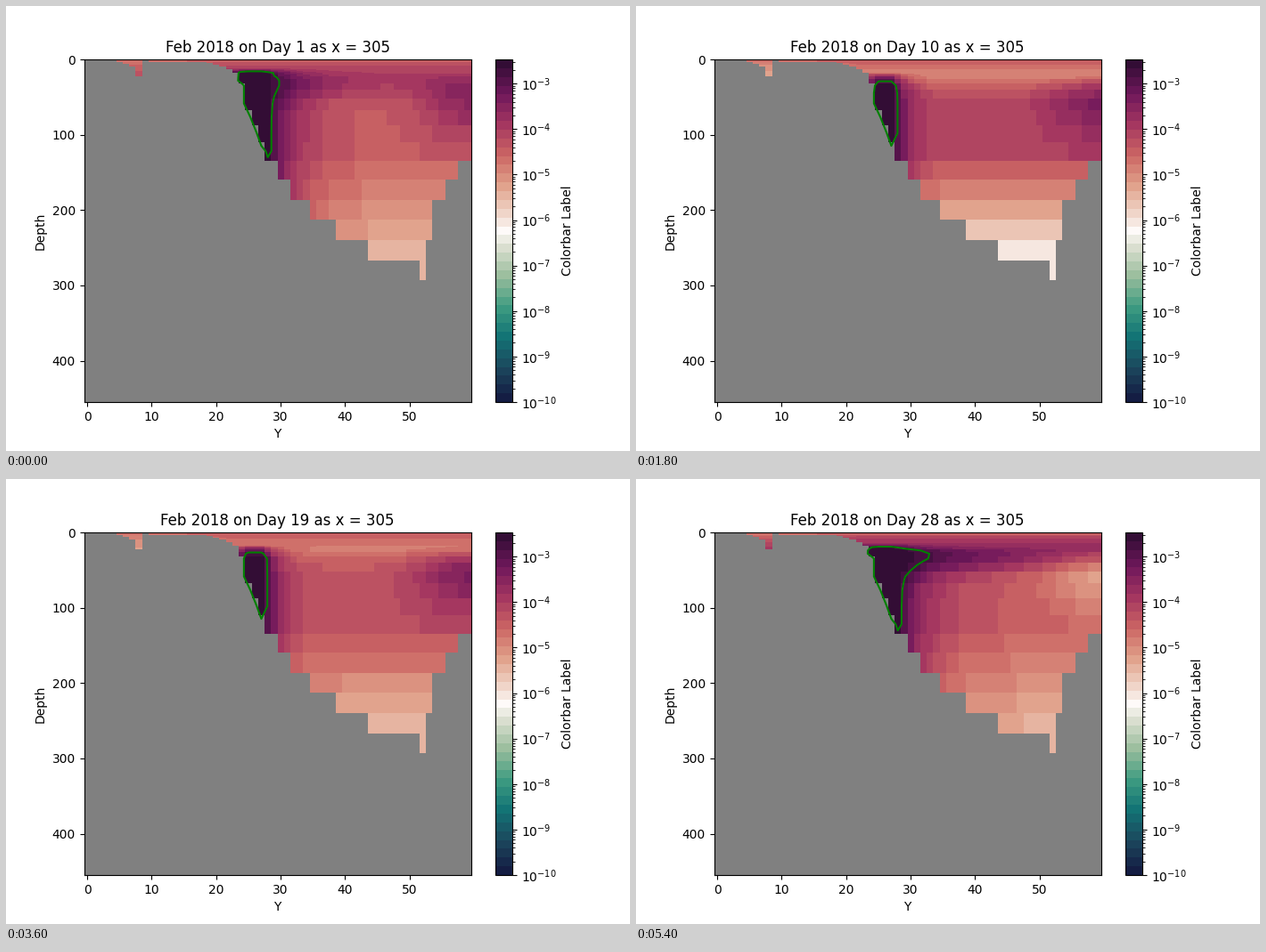
A matplotlib script that plays this animation: 700 by 500 pixels, repeating every 5.6 s.

```python
import numpy as np
import matplotlib.pyplot as plt
from matplotlib.animation import FuncAnimation
from matplotlib.colors import LinearSegmentedColormap, LogNorm

DAYS, STEP = 28, 200
THRESHOLD = 1.5e-3   # outlined concentration
CORE = 2.3           # -log10 concentration inside the plume

# Vertical grid: 1 m layers near the surface, stretching to 27 m at depth
k = np.arange(40)
z = 0.5 + k + 25.933 * 1.5 * np.log1p(np.exp((k - 23.5) / 1.5))
mid_z = (z[1:] + z[:-1]) / 2
edges = np.r_[0, mid_z, 2 * z[-1] - mid_z[-1]]
y = np.arange(60)
K, Y = np.meshgrid(k, y, indexing="ij")

# Sea floor: (column, number of wet layers)
FLOOR = [(4, 0), (5, 4), (7, 9), (8, 20), (9, 1), (10, 3), (18, 3), (21, 9),
         (24, 22), (25, 25), (28, 28), (30, 29), (32, 30), (35, 31), (39, 32),
         (44, 33), (51, 33), (52, 34), (53, 32), (54, 30.9), (59, 28)]
wet = np.floor(np.interp(y, *zip(*FLOOR)) + 1e-6)
dry = K >= wet

# How each feature of the field drifts over the month
KEY_DAYS = [1, 6, 10, 15, 19, 23, 28]
DRIFT = dict(
    upper=[4.0, 4.75, 4.95, 4.95, 4.85, 4.85, 3.6],    # layer below surface
    middle=[4.5, 4.25, 4.15, 4.65, 4.3, 4.3, 4.45],    # mid-depth water
    bottom=[5.45, 6.0, 6.0, 5.5, 5.45, 5.45, 5.4],     # deepest water
    reach=[4.5, 3.0, 2.2, 3.2, 2.2, 2.2, 4.5],         # plume decay, columns
    jet=[0.8, 1.3, 0, 0, 0, 0, 2.4],                   # sideways tongue
    lid=[17, 20.5, 22.5, 22, 22, 20.5, 20],            # plume top layer
    east=[0.9, 0.85, 0.75, 1.5, 0.9, 1.1, -0.8],       # patch at the far side
)


def bump(x, centre, width):
    return np.exp(-((x - centre) / width) ** 2)


def concentration(day):
    p = {name: np.interp(day, KEY_DAYS, v) for name, v in DRIFT.items()}
    field = np.interp(K, [2, 8, 20, 24, 27, 32],
                      [4.4, (p["upper"] + 4.4) / 2, p["upper"],
                       p["middle"], p["middle"], p["bottom"]])
    field += 0.35 * np.clip((22 - Y) / 12, 0, 1)
    field -= p["east"] * bump(Y, 59, 8) * bump(K, 23.5, 3)

    # Plume on the western slope, fading with distance from its core
    dist = np.maximum(0, np.maximum(Y - 27.2, 24.5 - Y))
    reach = p["reach"] * (1 + p["jet"] * bump(K, 21.8, 1.8))
    depth = np.clip((K - p["lid"] + 6) / 6, 0, 1)
    field -= (field - CORE) * depth * np.exp(-dist / reach)
    return np.where(dry, 0, 10.0 ** -field)


stops = [(20, 29, 67), (28, 72, 93), (18, 115, 117), (63, 156, 129),
         (153, 189, 156), (223, 225, 211), (254, 250, 249), (241, 218, 206),
         (224, 160, 137), (203, 101, 99), (164, 54, 96), (111, 23, 91),
         (51, 13, 53)]
pos = np.r_[np.arange(6) / 11, 0.5, np.arange(6, 12) / 11]
cmap = LinearSegmentedColormap.from_list(
    "curl", [(p, np.array(c) / 255) for p, c in zip(pos, stops)], N=39)

fig, ax = plt.subplots(figsize=(7, 5), dpi=100)
ax.set_facecolor("gray")
mesh = ax.pcolormesh(np.arange(61) - 0.5, edges,
                     np.ma.array(concentration(1), mask=dry),
                     cmap=cmap, norm=LogNorm(1e-10, 3.4e-3))
ax.set_xlim(-0.5, 59.5)
ax.set_ylim(edges[-1], 0)
ax.set_xlabel("Y")
ax.set_ylabel("Depth")
title = ax.set_title("")
fig.colorbar(mesh, ax=ax, label="Colorbar Label")
outlines = []


def update(i):
    day = i + 1
    c = concentration(day)
    mesh.set_array(np.ma.array(c, mask=dry))
    while outlines:
        outlines.pop().remove()
    outlines.append(ax.contour(y, z, c, levels=[THRESHOLD], colors="green"))
    title.set_text(f"Feb 2018 on Day {day} as x = 305")
    return mesh, title


anim = FuncAnimation(fig, update, frames=DAYS, interval=STEP,
                     repeat=True, repeat_delay=0)
plt.show()
```
